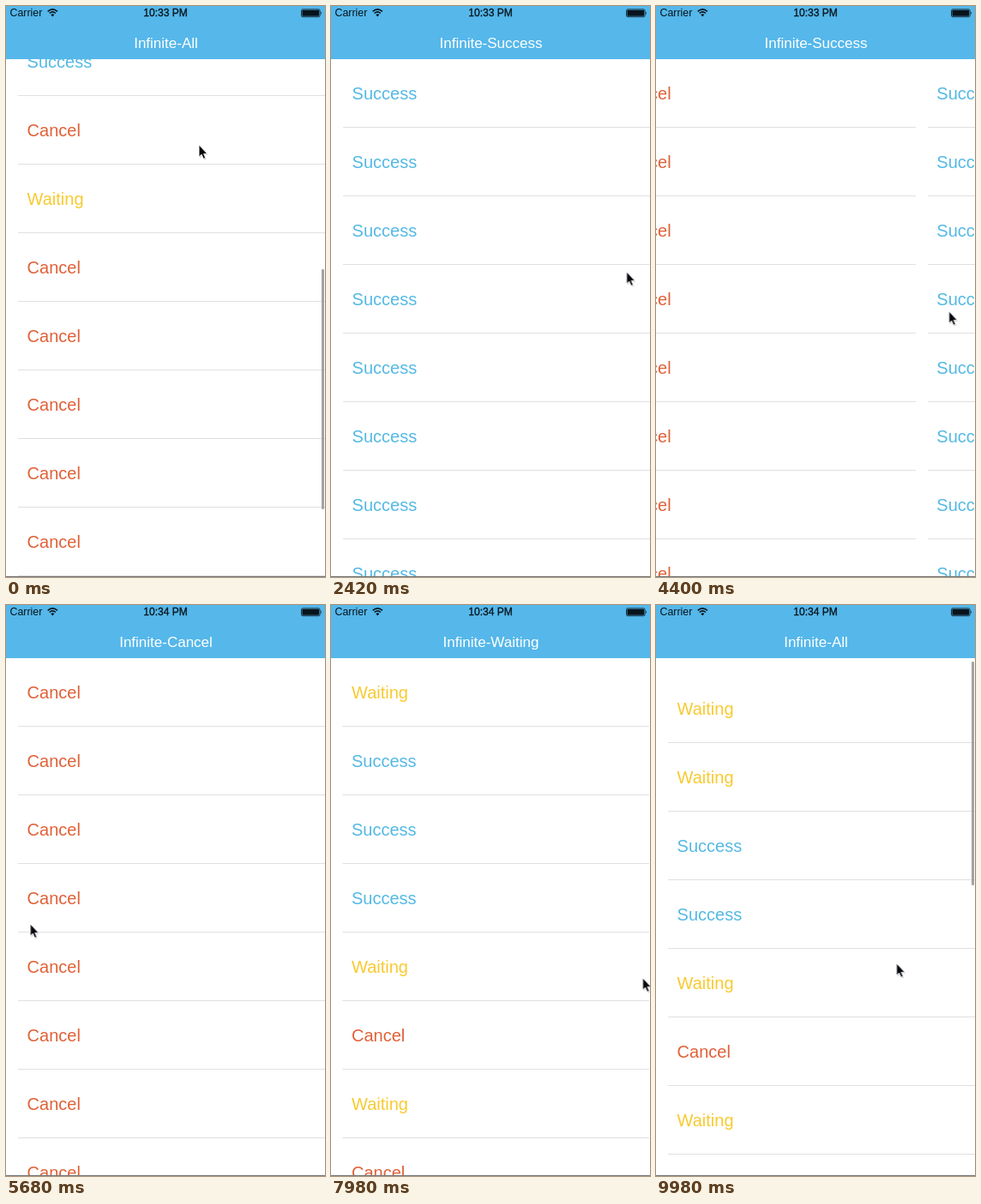
An HTML page for the animation above (10 s loop, 372 by 666 pixels).

```html
<!DOCTYPE html>
<html lang="en">
<head>
<meta charset="utf-8">
<title>Infinite pages</title>
<style>
html, body { margin: 0; width: 100%; height: 100%; overflow: hidden; background: #fff; }
#stage {
  position: relative; width: 372px; height: 666px; overflow: hidden; background: #fff;
  font-family: "Liberation Sans", Arial, sans-serif;
}
#stage *, #stage::after { position: absolute; box-sizing: border-box; }
#stage::after { content: ""; left: 0; top: 665px; width: 372px; height: 1px; background: #74787b; }
#strip, #bar, #cursor, .list, .title, .clock, .late, .early { animation: 10s linear infinite; }

/* pages */
#strip { left: 0; top: 62px; width: 372px; height: 604px; animation-name: slide; }
.page { top: 0; width: 372px; height: 604px; }
.list { left: 0; top: 0; width: 372px; }
.page:last-child .list { animation-name: scroll; }
.row { left: 0; width: 372px; height: 80px; font-size: 20px; line-height: 80px; white-space: nowrap; }
.row::after { content: ""; left: 14px; right: 0; bottom: 0; height: 1px; background: #e0e0e2; position: absolute; }
.row span { left: 24.6px; top: 0; }
.S { color: #54b9e4; }
.C { color: #df6138; }
.W { color: #f8ca30; }
.early { animation-name: early; animation-timing-function: step-end; }
.late { animation-name: late; animation-timing-function: step-end; }

/* header */
#head { left: 0; top: 0; width: 372px; height: 62px; background: #55b7ea; }
.title, .clock { left: 0; width: 373px; text-align: center; animation-timing-function: step-end; visibility: hidden; }
.title { top: 33px; font-size: 17px; line-height: 22px; color: #fff; }
.clock, #carrier { top: 0; font-size: 12px; line-height: 17px; color: #08141b; }
.clock { -webkit-text-stroke: .3px #08141b; width: 372px; }
#carrier { left: 4.5px; font-size: 12.4px; }
#icons { left: 0; top: 0; }

#bar {
  left: 368px; top: 66px; width: 2.5px; height: 280px; border-radius: 1.2px;
  background: #a2a2a4; animation-name: bar;
}
#cursor { left: 0; top: 0; overflow: visible; animation-name: point; }

@keyframes slide {
  0%, 17.1% { transform: translateX(0); animation-timing-function: ease-in; }
  18.8% { transform: translateX(125px); }
  20.7% { transform: translateX(310px); animation-timing-function: cubic-bezier(.15,.6,.3,1); }
  24.2%, 40.5% { transform: translateX(372px); animation-timing-function: cubic-bezier(.4,0,.7,.8); }
  44% { transform: translateX(674px); animation-timing-function: cubic-bezier(.15,.6,.3,1); }
  47.6%, 60.5% { transform: translateX(744px); animation-timing-function: cubic-bezier(.4,0,.7,.8); }
  63.4% { transform: translateX(1050px); animation-timing-function: cubic-bezier(.15,.6,.3,1); }
  66.6%, 73.5% { transform: translateX(1116px); animation-timing-function: cubic-bezier(.4,0,.7,.8); }
  76.8% { transform: translateX(1440px); animation-timing-function: cubic-bezier(.15,.6,.3,1); }
  79.8% { transform: translateX(1487.4px); }
  80.2%, 100% { transform: translateX(1488px); }
}
@keyframes point {
  0% { transform: translate(225px, 162px); animation-timing-function: ease-in-out; }
  15% { transform: translate(17px, 298px); }
  17.1% { transform: translate(26.5px, 302px); animation-timing-function: ease-in; }
  18.8% { transform: translate(151.5px, 303px); }
  20.7% { transform: translate(336.5px, 308px); animation-timing-function: ease-out; }
  22% { transform: translate(345px, 309px); }
  24% { transform: translate(345px, 310px); animation-timing-function: ease-in-out; }
  33%, 39.6% { transform: translate(29.5px, 325px); }
  40.5% { transform: translate(39.5px, 328px); animation-timing-function: cubic-bezier(.4,0,.7,.8); }
  44% { transform: translate(341.5px, 356px); animation-timing-function: ease-out; }
  45.5% { transform: translate(350px, 358px); }
  48.5% { transform: translate(350px, 359px); animation-timing-function: ease-in-out; }
  57% { transform: translate(28px, 372px); }
  59.8% { transform: translate(29px, 373px); }
  60.5% { transform: translate(39px, 375px); animation-timing-function: cubic-bezier(.4,0,.7,.8); }
  63.4% { transform: translate(345px, 397px); animation-timing-function: ease-out; }
  64.6% { transform: translate(350px, 398px); animation-timing-function: ease-in; }
  67.2% { transform: translate(222.5px, 405px); animation-timing-function: ease-out; }
  71.5%, 72.8% { transform: translate(28px, 413px); }
  73.5% { transform: translate(38px, 415px); animation-timing-function: cubic-bezier(.4,0,.7,.8); }
  76.8% { transform: translate(362px, 434px); animation-timing-function: ease-out; }
  78%, 81% { transform: translate(363.5px, 435px); animation-timing-function: ease-in-out; }
  87.5% { transform: translate(284px, 384px); animation-timing-function: ease-in-out; }
  92.5% { transform: translate(283px, 197px); animation-timing-function: ease-in; }
  97.8% { transform: translate(281px, 384px); animation-timing-function: ease-out; }
  99.8%, 100% { transform: translate(280.5px, 418px); }
}
@keyframes scroll {
  0%, 87.5% { transform: translateY(0); animation-timing-function: ease-in-out; }
  92.5% { transform: translateY(-187px); animation-timing-function: ease-in; }
  97.8% { transform: translateY(0); animation-timing-function: ease-out; }
  99.8%, 100% { transform: translateY(19px); }
}
@keyframes bar {
  0%, .6% { transform: translateY(241px); opacity: 1; }
  4% { transform: translateY(241px); opacity: 0; }
  4.1%, 87.4% { transform: none; opacity: 0; }
  87.5% { transform: none; opacity: 1; animation-timing-function: ease-in-out; }
  92.5% { transform: translateY(87px); animation-timing-function: ease-in; }
  97.8% { transform: none; height: 280px; animation-timing-function: ease-out; }
  99.8%, 100% { transform: none; height: 261px; opacity: 1; }
}
@keyframes early { 0% { visibility: visible; } 92.5%, 100% { visibility: hidden; } }
@keyframes late { 0% { visibility: hidden; } 92.5%, 100% { visibility: visible; } }
@keyframes all { 0% { visibility: visible; } 24.2% { visibility: hidden; } 80.2%, 100% { visibility: visible; } }
@keyframes success { 0% { visibility: hidden; } 24.2% { visibility: visible; } 47.6%, 100% { visibility: hidden; } }
@keyframes cancel { 0% { visibility: hidden; } 47.6% { visibility: visible; } 66.6%, 100% { visibility: hidden; } }
@keyframes waiting { 0% { visibility: hidden; } 66.6% { visibility: visible; } 80.2%, 100% { visibility: hidden; } }
@keyframes before { 0% { visibility: visible; } 54%, 100% { visibility: hidden; } }
@keyframes after { 0% { visibility: hidden; } 54%, 100% { visibility: visible; } }
</style>
</head>
<body>
<div id="stage">
  <div id="strip"></div>
  <div id="bar"></div>
  <div id="head">
    <div id="carrier">Carrier</div>
    <div class="clock" style="animation-name: before">10:33 PM</div>
    <div class="clock" style="animation-name: after">10:34 PM</div>
    <svg id="icons" width="372" height="20" fill="none" stroke="#08141b">
      <path d="M48.7 6.4Q54.3 1.4 59.9 6.4M50.7 8.5Q54.3 5.3 57.9 8.5" stroke-width="1.6"/>
      <path d="M52.3 10.1Q54.3 8.4 56.3 10.1L54.3 12.4Z" fill="#08141b" stroke="none"/>
      <rect x="344.5" y="3.9" width="21.6" height="8.8" rx="1.6" stroke-width=".8"/>
      <rect x="345.4" y="4.8" width="19.8" height="7" rx=".8" fill="#08141b" stroke="none"/>
      <path d="M367 6.6q1.8 1.7 0 3.4z" fill="#08141b" stroke="none"/>
    </svg>
    <div class="title" style="animation-name: all">Infinite-All</div>
    <div class="title" style="animation-name: success">Infinite-Success</div>
    <div class="title" style="animation-name: cancel">Infinite-Cancel</div>
    <div class="title" style="animation-name: waiting">Infinite-Waiting</div>
  </div>
  <svg id="cursor" width="14" height="20">
    <path d="M1 2V15.4L4 12.6L6.2 17.6L8.6 16.6L6.5 11.8H10.6Z" fill="#000" opacity=".18"/>
    <path d="M0 0V14L3.1 11.2L5.2 16.2L7.7 15.2L5.6 10.4H9.8Z" fill="#05080c" stroke="#fff" stroke-width=".9"/>
  </svg>
</div>
<script>
const labels = { S: 'Success', C: 'Cancel', W: 'Waiting' };
const strip = document.getElementById('strip');

function add(parent, tag, cls, style) {
  const el = parent.appendChild(document.createElement(tag));
  el.className = cls;
  el.style.cssText = style || '';
  return el;
}

function label(row, kind, phase = '') {
  add(row, 'span', `${kind} ${phase}`).textContent = labels[kind];
}

// Each page lies left of the one before; a pair such as "SW" is a reused cell.
function addPage(index, kinds, top = 0) {
  const page = add(strip, 'div', 'page', `left:${-372 * index}px`);
  const list = add(page, 'div', 'list', `top:${top}px`);
  kinds.forEach((kind, i) => {
    const row = add(list, 'div', 'row', `top:${80 * i}px`);
    if (kind.length === 1) return label(row, kind);
    label(row, kind[0], 'early');
    label(row, kind[1], 'late');
  });
}

addPage(0, [...'SCWCCCCCS'], -37);
[...'SCW'].forEach((kind, i) => addPage(i + 1, Array(8).fill(kind)));
addPage(4, ['W', 'SW', ...'SSWCWCSW']);
</script>
</body>
</html>
```
